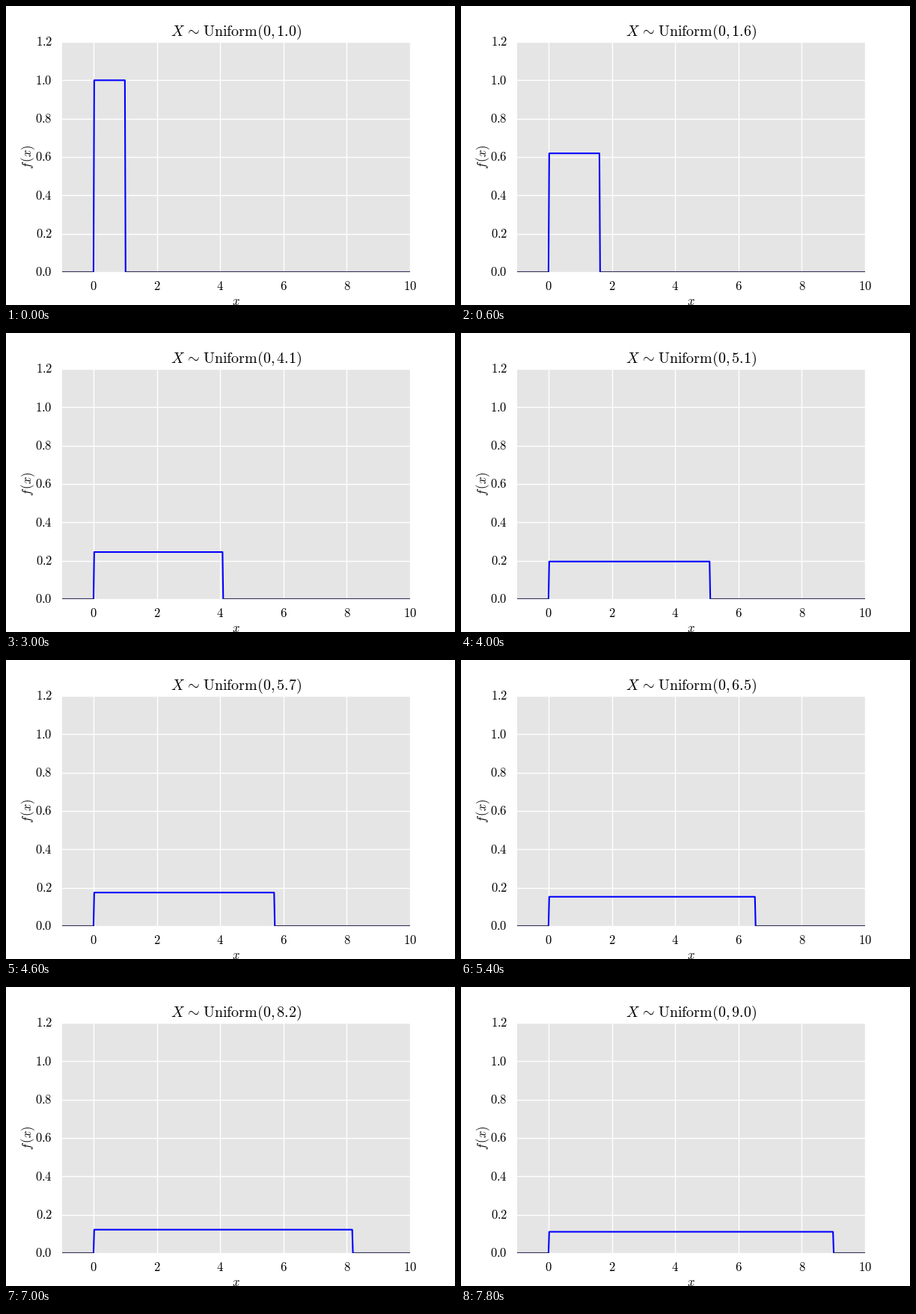
These frames come from a looping animation (600 px wide and 400 px high, 8 s). A matplotlib script:

```python
import matplotlib.pyplot as plt
import numpy as np
from matplotlib.animation import FuncAnimation

plt.rcParams["mathtext.fontset"] = "cm"

FRAMES, INTERVAL = 40, 200
BLUE, BASE = "#0000ff", "#333355"
HEIGHT = 400

fig = plt.figure(figsize=(6, 4), dpi=100, facecolor="white")
ax = fig.add_axes([0.125, 0.11, 0.775, 0.77], facecolor="#e5e5e5")
ax.set(xlim=(-1, 10), ylim=(0, 1.2))
ax.set_xticks(range(0, 11, 2))
ax.set_yticks(np.arange(7) * 0.2)
ax.set_axisbelow(True)
ax.grid(color="white", lw=1)
ax.tick_params(length=0, labelbottom=False, labelleft=False)
ax.spines[:].set_visible(False)


def label(x, y, tex, size=12, ha="center", **kw):
    """Place math text by its baseline, in pixels from the top left."""
    return fig.text(x, HEIGHT - y, f"${tex}$", transform=None, size=size,
                    ha=ha, va="baseline", color="black", **kw)


def to_px(x, y):
    px, py = ax.transData.transform((x, y))
    return px, HEIGHT - py


for v in range(0, 11, 2):
    label(to_px(v, 0)[0], 380, rf"\mathrm{{{v}}}")
for v in np.arange(7) * 0.2:
    label(62, to_px(0, v)[1] + 5.3, rf"\mathrm{{{v:.1f}}}", ha="right")

label(307.5, 400, "x")
label(34, 202, r"f\hspace{0.1}(x)", rotation=90, rotation_mode="anchor")
title = label(307.5, 40, "X", size=14.4)

xs = np.linspace(-1, 10, 500)
curve, = ax.plot([], [], color=BLUE, lw=1.5)
left, = ax.plot([], [], color=BASE, lw=1.5, solid_capstyle="butt")
right, = ax.plot([], [], color=BASE, lw=1.5, solid_capstyle="butt")


def update(i):
    b = 1 + 8 * i / (FRAMES - 1)
    inside = (xs >= 0) & (xs <= b)
    curve.set_data(xs, np.where(inside, 1 / b, 0))
    before, after = xs[xs < 0], xs[xs > b]
    left.set_data(before, np.zeros_like(before))
    right.set_data(after, np.zeros_like(after))
    title.set_text(r"$X\hspace{0.156}\sim\hspace{0.078}\mathrm{Uniform}"
                   rf"(\mathrm{{0}},\hspace{{-0.03}}\mathrm{{{b:.1f}}})$")
    return curve, left, right, title


anim = FuncAnimation(fig, update, frames=FRAMES, interval=INTERVAL,
                     repeat=True, repeat_delay=0)
plt.show()
```
